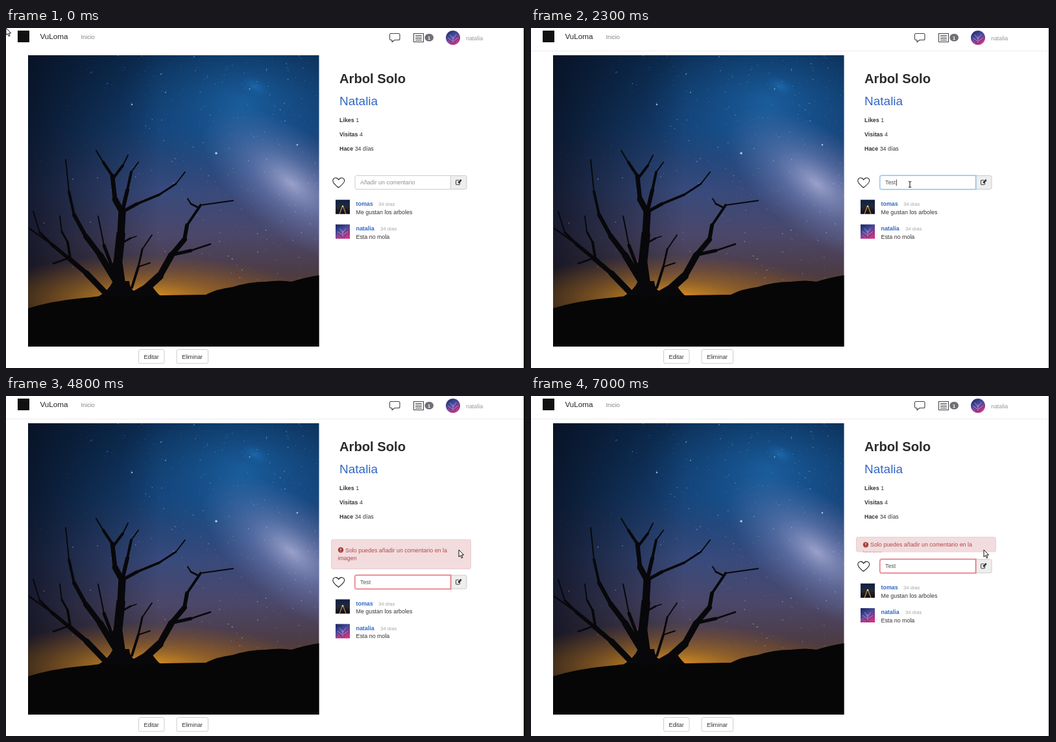
Animation of 800 by 524 pixels, one loop 7100 ms. Source, as an HTML page:

```html
<!DOCTYPE html>
<html lang="es">
<head>
<meta charset="utf-8">
<title>Arbol Solo</title>
<style>
html, body { margin: 0; width: 100%; height: 100%; overflow: hidden; background: #fff; }
svg { display: block; width: 100vw; height: 100vh; }
text { font: 8.9px "Liberation Sans", Arial, sans-serif; fill: #333; white-space: pre; }
.b { font-weight: bold; }
.link { fill: #3467c4; }
.mute { fill: #999; }
.ago { font-size: 7.75px; fill: #a5a5a5; }
.alert { fill: #b04b49; }
.icon { fill: none; stroke: #444; stroke-width: 1.1; stroke-linejoin: round; stroke-linecap: round; }
.btn { fill: #fff; stroke: #ccc; }
</style>
</head>
<body>
<svg viewBox="0 0 800 524">
  <defs>
    <linearGradient id="sky" x2="0" y2="1">
      <stop offset="0" stop-color="#0b2c52"/>
      <stop offset=".25" stop-color="#143f72"/>
      <stop offset=".46" stop-color="#374a7c"/>
      <stop offset=".62" stop-color="#4b4769"/>
      <stop offset=".74" stop-color="#4c3c46"/>
      <stop offset=".84" stop-color="#5a3d28"/>
    </linearGradient>
    <linearGradient id="shade">
      <stop offset="0" stop-color="#070b18" stop-opacity=".75"/>
      <stop offset=".45" stop-color="#070b18" stop-opacity="0"/>
    </linearGradient>
    <radialGradient id="milk">
      <stop offset="0" stop-color="#b3b6dc" stop-opacity=".8"/>
      <stop offset=".45" stop-color="#8793c8" stop-opacity=".42"/>
      <stop offset="1" stop-color="#6f80bb" stop-opacity="0"/>
    </radialGradient>
    <radialGradient id="blue">
      <stop offset="0" stop-color="#1f73bd" stop-opacity=".62"/>
      <stop offset="1" stop-color="#1763a8" stop-opacity="0"/>
    </radialGradient>
    <radialGradient id="glow">
      <stop offset="0" stop-color="#f0a41e" stop-opacity=".95"/>
      <stop offset=".45" stop-color="#c17d20" stop-opacity=".5"/>
      <stop offset="1" stop-color="#a9641c" stop-opacity="0"/>
    </radialGradient>
    <linearGradient id="burst" x2=".6" y2="1">
      <stop offset="0" stop-color="#17255f"/>
      <stop offset=".5" stop-color="#4a4a9c"/>
      <stop offset="1" stop-color="#c42b78"/>
    </linearGradient>
    <linearGradient id="road" x2="0" y2="1">
      <stop offset="0" stop-color="#0c2244"/>
      <stop offset=".5" stop-color="#24283a"/>
      <stop offset="1" stop-color="#0b0b10"/>
    </linearGradient>
    <clipPath id="frame"><rect x="34" y="42" width="448.5" height="449"/></clipPath>
    <clipPath id="fold"><rect id="foldBox" x="501" width="216"/></clipPath>
    <g id="fireworks">
      <rect width="22" height="22" fill="url(#burst)"/>
      <path d="M11 19V9M11 13L6 6M11 13L16 6M10 16L3 11M12 16L19 11" stroke="#b9b8ec" stroke-width=".9" opacity=".75"/>
      <path d="M0 17L5 22M22 17L17 22M3 15L8 22M19 15L14 22" stroke="#e04b94" stroke-width="1"/>
    </g>
    <clipPath id="round"><circle cx="11" cy="11" r="11"/></clipPath>
  </defs>

  <rect width="800" height="524" fill="#fff"/>
  <path id="rule" d="M0 35.5H798" stroke="#ececec"/>

  <rect x="18" y="4" width="18" height="18" fill="#111"/>
  <text x="52.5" y="17" style="font-size:11.7px;fill:#222">VuLoma</text>
  <text x="115.5" y="16.5" class="mute" style="font-size:9.2px;fill:#848484">Inicio</text>
  <path class="icon" d="M593 8.5H605Q607 8.5 607 10.5V16.5Q607 18.5 605 18.5H599L595 21.7V18.5H593Q591.5 18.5 591.5 16.5V10.5Q591.5 8.5 593 8.5Z"/>
  <path class="icon" d="M628.5 8.5H643.5V21.5H628.5ZM631.5 11.5H640.5M631.5 14H640.5M631.5 16.5H640.5M631.5 19H640.5"/>
  <rect x="645.5" y="9" width="13.5" height="11.5" rx="5.7" fill="#706f75"/>
  <text x="652.2" y="17.5" class="b" text-anchor="middle" style="font-size:7.5px;fill:#fff">1</text>
  <g transform="translate(678 4)" clip-path="url(#round)"><use href="#fireworks"/></g>
  <text x="709" y="19" class="mute">natalia</text>

  <g clip-path="url(#frame)">
    <rect x="34" y="42" width="449" height="449" fill="url(#sky)"/>
    <ellipse cx="365" cy="115" rx="190" ry="130" fill="url(#blue)"/>
    <ellipse cx="440" cy="240" rx="165" ry="80" fill="url(#milk)" transform="rotate(38 440 240)"/>
    <ellipse cx="385" cy="90" rx="24" ry="14" fill="url(#blue)" transform="rotate(25 385 90)"/>
    <rect x="34" y="42" width="449" height="449" fill="url(#shade)"/>
    <g id="stars" fill="#c3d6f2"></g>
    <ellipse cx="215" cy="418" rx="260" ry="68" fill="url(#glow)"/>
    <path fill="#060606" d="M34 432Q70 421 110 417T160 411L240 412 308 411Q325 402 350 399 375 391 400 391 425 388 440 391 462 384 483 381V492H34Z"/>
    <path fill="#08080b" d="M142 414Q158 405 165 390H190Q191 402 197 405L222 391Q226 402 238 413Z"/>
    <g id="tree" stroke="#08080b" stroke-linecap="round"></g>
  </g>

  <rect class="btn" x="204.5" y="495.5" width="39.5" height="21.5" rx="2.5"/>
  <text x="212.5" y="509.5">Editar</text>
  <rect class="btn" x="263" y="495.5" width="48.5" height="21.5" rx="2.5"/>
  <text x="271" y="509.5">Eliminar</text>

  <text x="514" y="84.5" class="b" style="font-size:20.2px;fill:#2b2b2b">Arbol Solo</text>
  <text x="514" y="119" class="link" style="font-size:19px">Natalia</text>
  <text x="514" y="145"><tspan class="b">Likes</tspan> 1</text>
  <text x="514" y="167"><tspan class="b">Visitas</tspan> 4</text>
  <text x="514" y="189"><tspan class="b">Hace</tspan> 34 días</text>

  <g id="alert" clip-path="url(#fold)">
    <rect id="alertBox" x="501.5" width="215" rx="2.5" fill="#f2dcde" stroke="#ebccd1"/>
    <g id="alertText">
      <circle cx="516" cy="-3.2" r="4.2" fill="#a63f3c"/>
      <path d="M516 -5.8V-3M516 -1.5V-.8" stroke="#f2dcde" stroke-width="1.4"/>
      <text x="523" class="alert">Solo puedes añadir un comentario en la</text>
      <text x="511.5" y="12.7" class="alert">imagen</text>
    </g>
  </g>

  <g id="lower">
    <path class="icon" style="stroke:#222" d="M512.5 246Q503.5 239 503.8 235.3C504.2 230 510.5 229.5 512.7 234 515 229.5 521.3 230 521.7 235.3Q521.8 239 512.5 246Z"/>
    <path d="M685.5 227.5H707.5Q710 227.5 710 230V246Q710 248.5 707.5 248.5H685.5Z" fill="#eee" stroke="#ccc"/>
    <path class="icon" d="M699.5 238.5V240Q699.5 241.5 698 241.5H695Q693.5 241.5 693.5 240V236Q693.5 234.5 695 234.5H697.5"/>
    <path d="M696.8 239.2V237L700.8 233 702.6 234.8 698.8 239.2Z" fill="#333"/>
    <path id="halo" fill="none" stroke-width="3.5" opacity=".25" d="M685.5 227.5H540.5Q538 227.5 538 230V246Q538 248.5 540.5 248.5H685.5Z"/>
    <path id="field" fill="#fff" d="M685.5 227.5H540.5Q538 227.5 538 230V246Q538 248.5 540.5 248.5H685.5Z"/>
    <text id="value" x="546" y="241"></text>
    <path id="caret" d="M563.5 233.5V243" stroke="#222" stroke-width=".8"/>

    <g transform="translate(508 264.7)">
      <rect width="22" height="22" fill="url(#road)"/>
      <path d="M10.5 10L6 22M11.5 10L16 22" stroke="#d89543" stroke-width="1.1"/>
      <circle cx="11" cy="10" r="1.3" fill="#ead2a0"/>
    </g>
    <text x="539.5" y="274" class="b link">tomas</text>
    <text x="574" y="274" class="ago">34 días</text>
    <text x="539.5" y="286.7">Me gustan los arboles</text>
    <use href="#fireworks" x="508" y="302.7"/>
    <text x="539.5" y="312" class="b link">natalia</text>
    <text x="577" y="312" class="ago">34 días</text>
    <text x="539.5" y="324.7">Esta no mola</text>
  </g>

  <path d="M799 0V524" stroke="#050505" stroke-width="2"/>
  <g id="pointer">
    <path id="arrow" d="M0 0V11L2.5 8.7 4.3 12.8 6 12 4.2 8H7.6Z" fill="#fff" stroke="#111" stroke-width="1" stroke-linejoin="round"/>
    <path id="beam" d="M-2.2 -4.5Q0 -4.5 0 -3.5 0 -4.5 2.2 -4.5M0 -3.5V3.5M-2.2 4.5Q0 4.5 0 3.5 0 4.5 2.2 4.5" fill="none" stroke="#222" stroke-width="1.1"/>
  </g>
</svg>
<script>
const LOOP = 7100;
const $ = id => document.getElementById(id);
const set = (el, attrs) => { for (const k in attrs) el.setAttribute(k, attrs[k]); return el; };
const add = (parent, tag, attrs) =>
  parent.appendChild(set(document.createElementNS(parent.namespaceURI, tag), attrs));
const show = (id, on) => { $(id).style.display = on ? '' : 'none'; };
const ease = (t, from, to) => {
  const p = Math.min(1, Math.max(0, (t - from) / (to - from)));
  return .5 - Math.cos(p * Math.PI) / 2;
};
const mix = (a, b, p) => a + (b - a) * p;

let seed = 11;
const rnd = () => (seed = seed * 16807 % 2147483647) / 2147483647;

function drawStars() {
  const star = (cx, cy, r, opacity) => add($('stars'), 'circle', { cx, cy, r, opacity });
  for (let i = 0; i < 620; i++) {
    const y = 42 + 350 * Math.pow(rnd(), 1.25);
    star(34 + 448 * Math.sqrt(rnd()), y, .35 + .6 * Math.pow(rnd(), 4), .15 + .5 * rnd());
  }
  star(324, 193, 1.8, .9);
  star(194, 118, 1.2, .8);
  star(449, 180, 1.3, .8);
}

// A branch is a line through points, thinning from w0 to w1.
function branch(w0, w1, coords) {
  const c = coords.split(' ').map(Number), n = c.length / 2 - 1;
  for (let i = 0; i < n; i++) {
    const [x1, y1, x2, y2] = c.slice(i * 2, i * 2 + 4);
    add($('tree'), 'line', { x1, y1, x2, y2, 'stroke-width': mix(w0, w1, n > 1 ? i / (n - 1) : .5) });
  }
}

function drawTree() {
  branch(16, 2, '178 408 172 365 177 318 179 284 168 264 164 228 150 207 139 189');
  branch(6, 2, '179 284 187 250 193 222 204 207');
  branch(4, 2, '165 232 180 212 188 196');
  branch(5, 2, '180 283 202 271 236 257 262 240 276 222');
  branch(10, 2, '168 388 145 350 123 321 105 288 97 252 92 203');
  branch(9, 2, '154 409 124 378 98 356 70 333 52 315 42 283');
  branch(3, 2, '70 333 36 309');
  branch(4, 2, '99 355 95 330 86 314 83 290');
  branch(3, 2, '98 354 73 363');
  branch(5, 2, '168 380 151 335 142 290');
  branch(3, 1.5, '172 335 192 324 201 321');
  branch(12, 2, '205 411 237 382 255 350 275 326 279 304 300 273 350 266');
  branch(3, 2, '297 277 285 271 280 263');
  branch(5, 2.5, '258 349 285 343 315 333');
  branch(4, 2, '194 400 204 368 210 341 225 319');
  branch(2.5, 1.5, '204 368 222 362');
}

function pointerAt(t) {
  const a = ease(t, 80, 900), b = ease(t, 2350, 2750), nudge = ease(t, 1600, 1800);
  return [mix(583 * a + nudge, 698, b), mix(241 * a, 237, b)];
}

function render(t) {
  show('rule', t >= 90);

  const open = ease(t, 2750, 3400) * (1 - ease(t, 6650, 7350));
  const top = 214.2 + 6.8 * open, height = 45.5 * open;
  show('alert', open > .01);
  set($('foldBox'), { y: top - .5, height: height + 1 });
  set($('alertBox'), { y: top, height });
  set($('alertText'), { transform: `translate(0 ${top + 10.2 + 9.3 * open})` });
  set($('lower'), { transform: `translate(0 ${48.7 * open})` });

  const error = t >= 2750, focus = t >= 1000 && !error;
  const typed = 'Test'.slice(0, Math.max(0, Math.floor((t - 1890) / 100)));
  $('value').textContent = typed || 'Añadir un comentario';
  $('value').style.fill = typed ? '#555' : '#8f8f8f';
  set($('field'), { stroke: error ? '#e0525a' : focus ? '#86b9e8' : '#ccc' });
  set($('halo'), { stroke: error ? '#e0525a' : '#66afe9' });
  show('halo', focus || error);
  show('caret', focus && typed === 'Test');

  const [x, y] = pointerAt(t);
  const inField = x > 538 && x < 685 && y > 227 && y < 249;
  set($('pointer'), { transform: `translate(${x} ${y})` });
  show('arrow', !inField);
  show('beam', inField);
}

drawStars();
drawTree();
const start = performance.now();
function tick() {
  render((performance.now() - start) % LOOP);
  requestAnimationFrame(tick);
}
tick();
</script>
</body>
</html>
```
